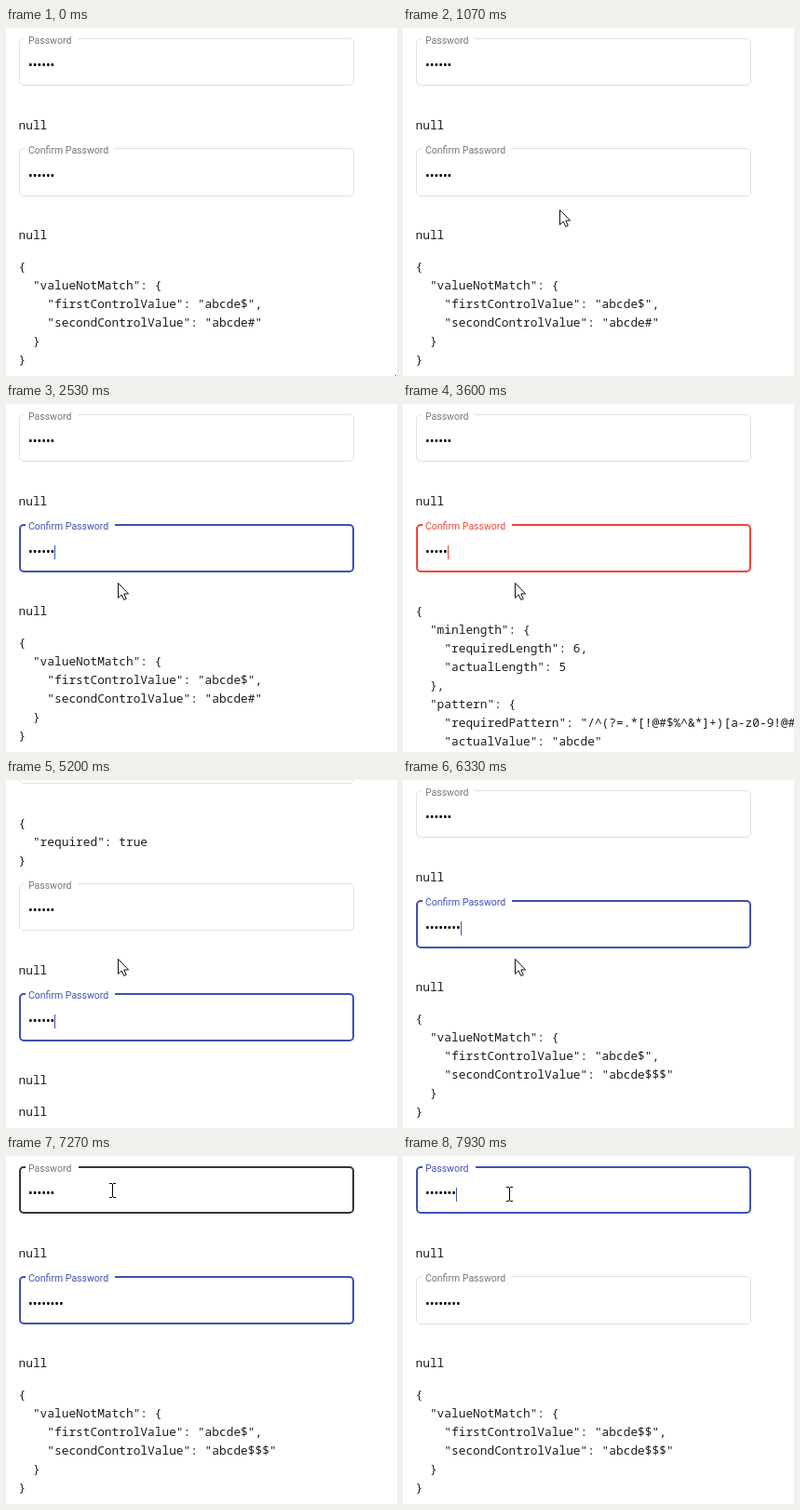
Animation, 420 px wide and 374 px high, one loop 8000 ms. Source, as an HTML page:

```html
<!DOCTYPE html>
<html lang="en">
<head>
<meta charset="utf-8">
<title>Password form</title>
<style>
  html, body { margin: 0; width: 100%; height: 100%; overflow: hidden; background: #fff; }
  #stage { position: relative; width: 100%; height: 100%; overflow: hidden; contain: strict; }
  #page, svg, .out { position: absolute; left: 0; top: 0; }
  #page { width: 100%; height: 100%; }
  #form { overflow: visible; }
  .out { left: 13.5px; }
  pre { margin: 0 0 14px; font: 12.83px/20px 'Noto Sans Mono', monospace; color: #1c1c1c; }
  text { font-family: Roboto, sans-serif; white-space: pre; }
  .label { font-size: 10.5px; }
  .dots { font-size: 14px; }
  path { fill: none; }
</style>
</head>
<body>
<div id="stage">
  <div id="page">
    <svg id="form" width="420" height="374"></svg>
    <div class="out" style="top:-64px"><pre>{
  "required": true
}</pre></div>
    <div class="out" style="top:94px"><pre>null</pre></div>
    <div class="out" style="top:212px"><pre id="errors"></pre><pre id="mismatch"></pre></div>
  </div>
  <svg width="420" height="374">
    <g id="pointer">
      <path id="arrow" d="M.5 .5V16.5L4.2 13L6.8 18.5L9.3 17.4L6.8 12H11.6Z" style="fill:#fff" stroke="#111"/>
      <path id="beam" d="M-3 -7.5h3M1 -7.5h3M.5 -7V7M-3 7.5h3M1 7.5h3" stroke="#000"/>
    </g>
  </svg>
</div>
<script>
const $ = id => document.getElementById(id);
const LOOP = 8000, TICK = 1000 / 15;
const BLUE = '#3f51b5', RED = '#f44336', DARK = 'rgba(0,0,0,.87)', FAINT = 'rgba(0,0,0,.12)', GREY = 'rgba(0,0,0,.54)';

// Ticks between which the caret is blinked off
const caretOff = [[30, 38], [45, 52], [70, 78], [91, 95], [103, 110], [118, 119]];

const out = p => 1 - (1 - p) ** 2;
const smooth = p => p * p * (3 - 2 * p);

// Pointer moves: start tick, end tick, target x, y, easing
const moves = [
  [9, 21, 116, 157, out],
  [26, 31, 120, 192, smooth],
  [99, 106, 117, 45, smooth],
  [106, 110, 114, 36, out],
  [112, 115, 114, 41, smooth]
];

function pointerAt(k) {
  let x = 418, y = 373;
  for (const [a, b, tx, ty, ease] of moves) {
    const p = ease(Math.min(1, Math.max(0, (k - a) / (b - a))));
    x += (tx - x) * p;
    y += (ty - y) * p;
  }
  return [Math.round(x), Math.round(y)];
}

// Rounded frame, open along the top between g0 and g1
function outline(top, bottom, g0, g1, width, color, opacity) {
  const h = width / 2, l = 14 + h, r = 374 - h, t = top + h, b = bottom - h, c = 5 - h;
  const arc = (x, y) => `a${c} ${c} 0 0 1 ${x} ${y}`;
  return `<path stroke="${color}" stroke-width="${width}" opacity="${opacity}" d="M${g1} ${t}H${r - c}${arc(c, c)}` +
    `V${b - c}${arc(-c, c)}H${l + c}${arc(-c, -c)}V${t + c}${arc(c, -c)}H${g0}"/>`;
}

function field({ label, top, bottom, gap, value, accent, hover, caret }) {
  const thick = accent ? 1 : hover, n = value.length;
  return outline(top, bottom, 20, gap, 1, FAINT, 1 - thick) +
    outline(top, bottom, 21, gap + 1, 2, accent || DARK, thick) +
    `<text class="label" x="24" y="${top + 6}" fill="${accent || GREY}">${label}</text>` +
    `<text class="dots" x="24" y="${bottom - 17}">${'•'.repeat(n)}</text>` +
    (caret ? `<rect x="${24 + Math.round(4.72 * n)}" y="${top + 23}" width="1" height="15" fill="${accent}"/>` : '');
}

const json = v => JSON.stringify(v, null, 2);
const hoverSince = (k, start) => k < start ? 0 : 1 - (1 - Math.min(1, (k - start) * TICK / 600)) ** 4;

function draw(ms) {
  const k = Math.floor((ms % LOOP + 5) / TICK) % 120;
  const first = k < 119 ? 'abcde$' : 'abcde$$';
  const second = k < 54 ? 'abcde#' : k < 62 ? 'abcde' : k < 83 ? 'abcde$' : k < 95 ? 'abcde$$' : 'abcde$$$';
  const errors = second.length < 6 ? {
    minlength: { requiredLength: 6, actualLength: second.length },
    pattern: { requiredPattern: '/^(?=.*[!@#$%^&*]+)[a-z0-9!@#$%^&*]{6,32}$/', actualValue: second }
  } : null;
  const same = first === second;
  const focus = k < 22 ? 0 : k < 110 ? 2 : 1;
  const caret = !caretOff.some(([a, b]) => k >= a && k < b);

  $('errors').textContent = json(errors);
  $('mismatch').textContent = json(same ? null : {
    valueNotMatch: { firstControlValue: first, secondControlValue: second }
  });
  $('form').innerHTML = outline(-148, -96, 20, 76, 1, FAINT, 1) +
    field({ label: 'Password', top: 11, bottom: 62, gap: 77, value: first,
      accent: focus === 1 && BLUE, hover: hoverSince(k, 105), caret: caret && focus === 1 }) +
    field({ label: 'Confirm Password', top: 129, bottom: 181, gap: 116, value: second,
      accent: focus === 2 && (errors ? RED : BLUE), hover: k < 110 ? hoverSince(k, 17) : 0, caret: caret && focus === 2 });

  // A shorter page cannot stay scrolled as far
  const shift = same ? 100 : 0;
  $('page').style.transform = `translateY(${shift}px)`;

  const [x, y] = pointerAt(k), py = y - shift;
  const inField = x < 374 && (py >= 11 && py <= 62 || py >= 129 && py <= 181);
  $('pointer').setAttribute('transform', `translate(${x} ${y})`);
  $('arrow').style.display = inField ? 'none' : '';
  $('beam').style.display = inField ? '' : 'none';
}

const start = performance.now();
function frame() {
  draw(performance.now() - start);
  requestAnimationFrame(frame);
}
frame();
</script>
</body>
</html>
```
